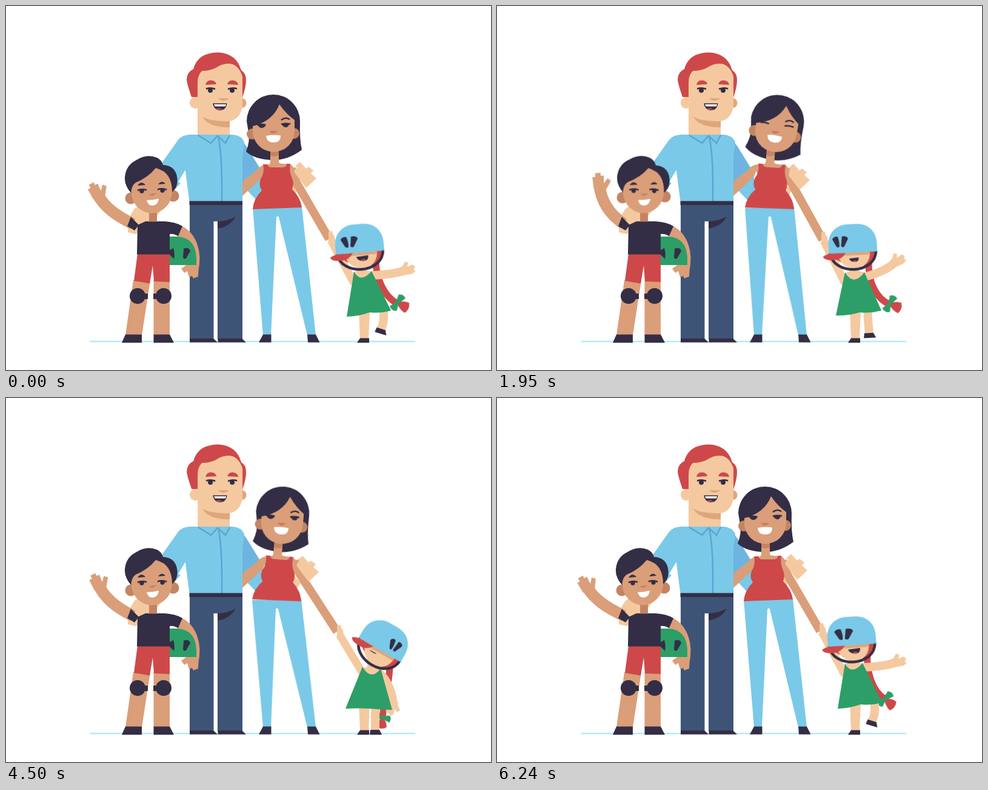
Animation, 800 px wide and 600 px high, one loop 6270 ms. Source, as an HTML page without scripts:

```html
<!DOCTYPE html>
<html lang="en">
<head>
<meta charset="utf-8">
<title>Family</title>
<style>
html, body { margin: 0; width: 100%; height: 100%; overflow: hidden; background: #fff; }
svg { display: block; width: 100vw; height: 100vh; }

.light { fill: #f5c9a0; } .lightDk { fill: #dfa67c; }
.tan { fill: #da9e79; } .tanDk { fill: #c48463; }
.ink { fill: #332e45; } .red { fill: #ce4849; }
.sky { fill: #7ac9e8; } .skyDk { fill: #6db5e0; }
.denim { fill: #3e5476; } .green { fill: #2d9e68; } .white { fill: #fff; }
.line { fill: none; stroke: #332e45; stroke-width: 2.5; }
.seam { fill: none; stroke: #5aa5d3; stroke-width: 2.5; }
.limb { fill: none; stroke-width: 14; }
.limb.l { stroke: #f5c9a0; } .limb.t { stroke: #da9e79; }

.a { animation: 6270ms ease-in-out infinite; }
.wave { animation: 447.857ms cubic-bezier(.37,0,.63,1) -107ms infinite alternate; }

/* boy */
#bArm { animation-name: bArm; stroke-width: 19; }
#bHand { animation-name: bHand; }
#bHead { animation-name: bHead; transform-origin: 242px 345px; }
@keyframes bArm {
  from { d: path("M209 359 C181 346 160 334 146 314"); }
  to { d: path("M209 359 C191 344 179 320 181 285"); }
}
@keyframes bHand {
  from { transform: translate(146px,315px) rotate(-33deg); }
  to { transform: translate(181px,286px) rotate(9deg); }
}
@keyframes bHead {
  0%, 71.8%, 99.5%, 100% { transform: none; }
  17.2%, 31.1%, 82.8% { transform: rotate(2deg); }
  53.1% { transform: rotate(3.5deg); }
}

/* father */
#fHead { animation-name: fHead; transform-origin: 342px 204px; }
#fShirt { animation-name: fShirt; transform-origin: 342px 322px; }
.fHand { animation-name: fHand; }
.open { animation-name: open; animation-timing-function: step-end; }
.shut { animation-name: shut; animation-timing-function: step-end; }
.pupil { animation-name: pupil; }
@keyframes fHead {
  0%, 38%, 69%, 100% { transform: none; }
  46%, 60.5% { transform: rotate(12deg); }
  82.8% { transform: translate(1px,0); }
}
@keyframes fShirt {
  0%, 38%, 69%, 100% { transform: none; }
  46%, 60.5% { transform: skewX(1deg); }
  82.8% { transform: skewX(-.5deg); }
}
@keyframes fHand {
  0%, 100% { transform: none; }
  17.2%, 82.8% { transform: translate(3px,1px); }
  31.1%, 53.1%, 71.8% { transform: translate(4px,3px); }
}
@keyframes pupil { 0%, 38%, 69%, 100% { transform: none; } 46%, 60.5% { transform: translate(2px,-1px); } }
@keyframes open { 0% { opacity: 1; } 41% { opacity: 0; } 65% { opacity: 1; } }
@keyframes shut { 0% { opacity: 0; } 41% { opacity: 1; } 65% { opacity: 0; } }

/* mother */
.mHead { animation-name: mHead; transform-origin: 443px 250px; }
#mTorso { animation-name: mTorso; transform-origin: 447px 334px; }
#mLegs { animation-name: mLegs; transform-origin: 460px 542px; }
#mArm { animation-name: mArm; }
.look { animation-name: look; animation-timing-function: step-end; }
@keyframes mHead {
  0%, 100% { transform: none; }
  17.2% { transform: translate(4.5px,0); }
  31.1% { transform: translate(11px,0) rotate(10deg); }
  53.1% { transform: translate(11px,0) rotate(11.5deg); }
  71.8% { transform: translate(10px,0) rotate(5deg); }
  82.8% { transform: translate(6px,0); }
  99.5% { transform: translate(1px,0); }
}
@keyframes mTorso {
  0%, 99.5%, 100% { transform: none; }
  17.2%, 82.8% { transform: translate(1px,0) rotate(2deg); }
  31.1% { transform: translate(2px,0) rotate(4deg); }
  53.1% { transform: translate(-2px,0) rotate(5deg); }
  71.8% { transform: translate(-1px,0) rotate(4.5deg); }
}
@keyframes mLegs {
  0%, 99.5%, 100% { transform: none; }
  17.2%, 82.8% { transform: skewX(-.3deg); }
  31.1% { transform: skewX(-.55deg); }
  53.1% { transform: skewX(.65deg); }
  71.8% { transform: skewX(.3deg); }
}
@keyframes mArm {
  0%, 99.5%, 100% { d: path("M471 268 L479 291 L533 384"); }
  17.2%, 82.8% { d: path("M474 268 L482 291 L540 386"); }
  31.1% { d: path("M478 268 L485 291 L537 385"); }
  44%, 53.1%, 71.8% { d: path("M476 268 L485 291 L546 385"); }
}
@keyframes look { 0% { opacity: 1; } 30.4% { opacity: 0; } 32.6% { opacity: 1; } }

/* girl */
#gHead { animation-name: gHead; transform-origin: 594px 386px; }
#vents { animation-name: vents; transform-origin: 575px 390px; }
#gMouth { animation-name: gMouth; }
#gNeck { animation-name: gNeck; }
#dress { animation-name: dress; }
#armL { animation-name: armL; stroke-width: 13; }
#handL { animation-name: handL; }
#armR { animation-name: armR; }
#handR { animation-name: handR; }
#leg { animation-name: leg; }
#shoe { animation-name: shoe; }
#braid { animation-name: braid; fill: none; stroke: #ce4849; stroke-width: 11; }
#bow { animation-name: bow; }
@keyframes gHead {
  0%, 100% { transform: translate(-12px,-3px) rotate(-5deg); }
  17.2% { transform: none; }
  31.1% { transform: translate(-8px,-3px) rotate(-3deg); }
  44%, 53.1% { transform: translate(39px,12px) rotate(35deg); }
  71.8% { transform: translate(34px,9px) rotate(30deg); }
  82.8% { transform: translate(2px,0); }
  99.5% { transform: translate(-10px,-2px) rotate(-4deg); }
}
@keyframes vents {
  0%, 100% { transform: translate(4px,0) scale(1.1,1); }
  17.2%, 31.1% { transform: none; }
  44%, 53.1%, 71.8% { transform: translate(38px,0) scale(.85,1); }
  82.8% { transform: translate(28px,0) scale(1.2,1); }
  99.5% { transform: translate(8px,0) scale(1.2,1); }
}
@keyframes gMouth {
  0%, 99.5%, 100% { transform: translate(597px,415px) scale(1.25); }
  17.2%, 31.1%, 82.8% { transform: translate(595px,418px); }
  44%, 53.1%, 71.8% { transform: translate(586px,417px) scale(.8,.25); }
}
@keyframes gNeck {
  0%, 99.5%, 100% { transform: translate(-6px,-5px); }
  17.2%, 82.8% { transform: translate(1px,0); }
  31.1% { transform: translate(-4px,-4px); }
  44%, 53.1%, 71.8% { transform: translate(9px,2px); }
}
@keyframes dress {
  0%, 99.5%, 100% { d: path("M574 438 Q585 458 603 437 L635 502 Q618 507 600 505 Q580 512 562 512Z"); }
  17.2% { d: path("M580 443 Q594 470 609 442 L637 508 Q620 514 600 512 Q580 511 562 512Z"); }
  31.1% { d: path("M574 439 Q588 463 606 439 L634 502 Q616 507 598 505 Q580 511 559 510Z"); }
  44%, 53.1% { d: path("M588 445 Q600 467 619 447 L643 511 Q625 515 605 512 Q585 510 566 514Z"); }
  71.8% { d: path("M588 443 Q602 467 618 446 L637 514 Q618 514 600 512 Q580 511 560 512Z"); }
  82.8% { d: path("M581 443 Q595 470 612 443 L637 508 Q618 514 600 512 Q580 513 560 514Z"); }
}
@keyframes armL {
  0%, 99.5%, 100% { d: path("M574 457 L536 386"); }
  17.2%, 82.8% { d: path("M580 457 L544 390"); }
  31.1% { d: path("M574 457 L539 387"); }
  44%, 53.1%, 71.8% { d: path("M589 455 L550 390"); }
}
@keyframes handL {
  0%, 99.5%, 100% { transform: translate(536px,384px); }
  17.2%, 82.8% { transform: translate(543px,387px); }
  31.1% { transform: translate(539px,385px); }
  44%, 53.1%, 71.8% { transform: translate(550px,387px); }
}
@keyframes armR {
  0%, 99.5%, 100% { d: path("M600 444 Q635 443 655 437"); }
  8.6% { d: path("M604 447 Q640 442 664 432"); }
  17.2% { d: path("M608 450 Q640 443 658 428"); }
  24% { d: path("M606 448 Q640 441 664 431"); }
  31.1% { d: path("M604 447 Q638 439 655 424"); }
  36.7% { d: path("M608 450 Q645 445 670 438"); }
  44%, 53.1% { d: path("M614 455 Q624 458 624 478"); }
  71.8% { d: path("M614 452 Q634 468 639 503"); }
  78.1% { d: path("M612 450 Q645 450 671 438"); }
  82.8% { d: path("M608 451 Q642 454 663 440"); }
  90.9% { d: path("M607 448 Q640 448 663 440"); }
}
@keyframes handR {
  0%, 99.5%, 100% { transform: translate(655px,437px) rotate(-10deg); }
  8.6% { transform: translate(664px,432px) rotate(-16deg); }
  17.2% { transform: translate(658px,428px) rotate(-25deg); }
  24% { transform: translate(664px,431px) rotate(-20deg); }
  31.1% { transform: translate(655px,424px) rotate(-25deg); }
  36.7% { transform: translate(670px,438px) rotate(-15deg); }
  44%, 53.1% { transform: translate(622px,478px) rotate(95deg); }
  71.8% { transform: translate(639px,503px) rotate(115deg); }
  78.1% { transform: translate(671px,438px) rotate(-15deg); }
  82.8% { transform: translate(663px,441px) rotate(-16deg); }
  90.9% { transform: translate(663px,440px) rotate(-12deg); }
}
@keyframes leg {
  0%, 99.5%, 100% { d: path("M622 498 Q626 520 617 536"); }
  17.2% { d: path("M617 505 Q619 525 614 546"); }
  31.1% { d: path("M611 498 Q612 520 614 541"); }
  44%, 53.1%, 71.8%, 82.8% { d: path("M609 505 Q609 525 609 549"); }
}
@keyframes shoe {
  0%, 99.5%, 100% { transform: translate(618px,536px) rotate(17deg); }
  17.2% { transform: translate(613px,546px) rotate(15deg); }
  31.1% { transform: translate(614px,543px) rotate(-3deg); }
  44%, 53.1%, 71.8%, 82.8% { transform: translate(609px,551px); }
}
@keyframes braid {
  0%, 100% { d: path("M610 420 C610 450 625 480 645 490"); }
  17.2% { d: path("M622 425 C618 455 625 490 648 502"); }
  31.1% { d: path("M613 420 C612 455 625 482 648 492"); }
  44%, 53.1%, 71.8% { d: path("M633 440 C633 470 623 500 621 528"); }
  82.8% { d: path("M620 425 C621 455 606 490 608 514"); }
  99.5% { d: path("M611 422 C609 452 620 485 640 496"); }
}
@keyframes bow {
  0%, 100% { transform: translate(645px,489px) rotate(28deg); }
  17.2% { transform: translate(648px,501px) rotate(30deg); }
  31.1% { transform: translate(647px,491px) rotate(22deg); }
  44%, 53.1%, 71.8% { transform: translate(621px,526px) rotate(95deg) scale(.9); }
  82.8% { transform: translate(609px,515px) rotate(92deg) scale(.9); }
  99.5% { transform: translate(639px,496px) rotate(40deg); }
}
</style>
</head>
<body>
<svg viewBox="0 0 800 600">
<path d="M138.500 553H675" stroke="#b5ebf5" stroke-width="2.500"/>

<!-- father -->
<path class="skyDk" d="M388 220 L397 232 L418 266 L428 298 L414 321 L389 290Z"/>
<path class="sky" d="M420 280 L428 298 L414 321 L396 302Z"/>
<path class="tan" d="M432 261 Q421 261 414 270 L389 290 V314 L424 281Z"/>
<path class="light" d="M240 315 L212 334 L202 350 L201 373 L214 376 L236 362 L262 330Z"/>
<path class="sky" d="M304 212 Q290 212 283 222 L256 260 L276 305 L288 292 L284 290 L296 270 L320 230Z"/>
<g id="fHead" class="a">
  <circle class="lightDk" cx="388.500" cy="160" r="8"/>
  <path class="light" d="M316 222 V110 L340 90 H375 L390 108 V165 Q387 186 369 190 V222Z"/>
  <path class="lightDk" d="M324 182 Q334 190 369 190 V200 Q332 200 324 182Z"/>
  <circle class="light" cx="312.500" cy="159.500" r="9.700"/>
  <path class="red" d="M316 150 H306 Q299 130 298 122 Q298 109 309 104 Q316 77 350 76.500 Q380 78 388 106 Q396 111 396 122 Q396 133 390 151 V116 Q383 95 367 95 Q356 95 346 102 Q336 107 323 107 Q316 114 316 126Z"/>
  <path class="red" d="M329 130 Q331 122 338 122.500 Q346 123 347 129Z M365 129 Q367 122 374 122.500 Q382 123 383 130Z"/>
  <path class="line" d="M330 136.500 Q338 134 345 137 M366 137 Q374 134 381 136.500"/>
  <g class="ink a pupil"><circle cx="337" cy="139" r="4"/><circle cx="373" cy="139" r="4"/></g>
  <path class="lightDk" d="M350 152 H368 Q361 158 354 155Z"/>
  <g class="a open">
    <path class="ink" d="M341 160.500 H364.500 Q363 172 352 172 Q343 171 341 160.500Z"/>
    <path class="white" d="M343 162 H363 L362 165.500 H344.500Z"/>
    <path class="red" d="M346 169.500 Q351 166.500 357 170.500 Q351 172.500 346 169.500Z"/>
  </g>
  <path class="line a shut" d="M345 165 Q355 169.500 366 165" stroke-linecap="round" opacity="0"/>
</g>
<g id="fShirt" class="a">
  <path class="sky" d="M302 212 H374 Q388 213 393 224 L390 250 V322 H302.500 L296 272 L288 235Z"/>
  <path class="seam" d="M317 213 L338 226 L349 214 L362 226 L369 213 M350 215 Q357 245 356 322"/>
</g>
<path class="denim" d="M303 327 H390 V549 H349 V355 H342.500 V549 H303Z"/>
<path class="ink" d="M302.500 321.500 H390 V328 H302.500Z M349 355 Q367 354 378.500 347 Q371 363 349 367Z M303 548 H342 L349 554.500 H303Z M349.500 548 H389 L396 554.500 H349.500Z"/>

<!-- mother -->
<g id="mLegs" class="a">
  <path class="sky" d="M407 333 L488 331 Q491 360 495 395 L511 543 H497 L450 348 Q448 345 446 348 L437 543 H424Z"/>
</g>
<path class="ink" d="M424 541.500 H437.500 V554.500 H417Z M497 541.500 H511 L517.500 554.500 H498Z"/>
<g class="a mHead">
  <path class="ink" d="M397 190 A44 44 0 0 1 485 190 Q484 220 488 237 Q466 254 440 254 Q410 253 396 240 Q403 222 400 208Z"/>
</g>
<path class="light a fHand" d="M468 286 L482 302 L475 312 L470 302Z"/>
<path id="mArm" class="limb t a" stroke-linejoin="round" d="M471 268 L479 291 L533 384"/>
<path class="light a fHand" d="M474 272 L480 266 L477 264 L485 257 L495 268 L499 265 L507 271 L503 276 L512 284 L495 300 L489 292Z"/>
<g id="mTorso" class="a">
  <path class="tan" d="M436 236 H450 V258 Q453 261 466 260 Q473 261 476 270 L474 292 L425 280 L419 270 Q422 261 434 261 Q436 260 436 256Z"/>
  <path class="tanDk" d="M436 238 H450 V246 Q443 249 436 247Z"/>
  <path class="red" d="M424 261 Q427 275 420 285 Q416 296 422 304 Q408 318 407 335 L488 332 Q486 316 472 302 Q476 292 471 282 Q467 272 469 260 L463 260 Q463 266 456 266 H438 Q432 266 431 261Z"/>
</g>
<g class="a mHead">
  <g class="tanDk"><circle cx="406" cy="211" r="9"/><circle cx="475" cy="210" r="9"/></g>
  <path class="tan" d="M407 198 Q440 190 451 162 Q462 178 476 188 V206 A34.500 34.500 0 0 1 407 206Z"/>
  <path class="line" d="M454 188 Q461 182 468 187 M454 195 Q461 193 469 194.500 M414 196 Q421 194 428 196"/>
  <g class="ink a look"><path d="M415 195 H429 Q427 201 421 201 Q416 200 415 195Z M455 194 H467 Q466 200 461 200 Q456 199 455 194Z"/></g>
  <path fill="#c57a60" d="M434 206 H448 Q442 212 437 209Z"/>
  <path class="white" d="M429 214 Q441 212 453 213.500 Q453 225 441 225 Q430 225 429 214Z"/>
</g>

<!-- girl -->
<path id="braid" class="a" d="M610 420 C610 450 625 480 645 490"/>
<g id="bow" class="a">
  <path class="red" d="M2 -2 Q9 -9 18 -9 Q24 0 19 9 Q9 8 2 2Z"/>
  <path class="green" d="M-2 0 L-4 -13 Q2 -18 9 -13 L3 0 L6 12 Q-1 17 -8 11Z"/>
</g>
<path id="armR" class="limb l a" d="M600 444 Q635 443 655 437"/>
<path id="handR" class="light a" d="M-4 -7 L0 -8 L6 -15 L11 -12 L8 -6 L17 -8 L21 -4 L18 0 L20 4 L14 7 H-4Z"/>
<path class="light" d="M582 503 H600 L598 549 H584Z"/>
<path class="ink" d="M584 547.500 H599 V555 H579Z"/>
<path id="leg" class="limb l a" d="M622 498 Q626 520 617 536"/>
<path id="shoe" class="ink a" d="M-8 -4 H7 L11 4 H-9Z"/>
<path id="armL" class="limb l a" d="M574 457 L536 386"/>
<path id="handL" class="light a" d="M-4 -12 L2 -13 L3 -8 L6 -4 L7 8 L-4 9Z"/>
<path id="gNeck" class="light a" d="M578 444 L587 441 V428 H601 V441 L611 443 Q596 475 578 444Z"/>
<path id="dress" class="green a" d="M574 438 Q585 458 603 437 L635 502 Q618 507 600 505 Q580 512 562 512Z"/>
<g id="gHead" class="a">
  <path class="red" d="M600 408 H630 Q629 428 612 434Z M560 408 H580 L577 426 Q565 422 560 408Z"/>
  <path class="line" style="stroke-width:4.500" d="M556 408 C559 446 630 448 632 408"/>
  <path class="light" d="M567 408 H622 Q622 434 596 435 Q572 434 567 408Z"/>
  <path class="lightDk" d="M567 408 H622 V414 H568Z"/>
  <g id="gMouth" class="a">
    <path class="ink" d="M-8 1 L8 0 Q8 7 2 7 Q-6 7 -8 1Z"/>
    <path class="red" d="M-3 6 Q2 3 5 6 Q1 8 -3 6Z"/>
  </g>
  <path class="sky" d="M554 409.500 V396 C554 373 571 362.500 586 362.500 H602 C618 363 634 373 634 396 V409.500Z"/>
  <path class="red" d="M544 414 Q549 410 556 409.500 H582 Q574 422 558 420 Q547 420 544 414Z"/>
  <path id="vents" class="ink a" d="M561 386 Q564 381 570 382 Q573 391 572 399 Q569 401 567 398Z M577 382 Q585 381 587 386 L580 399 Q577 401 575 398Z"/>
</g>

<!-- boy -->
<path class="limb t" style="stroke-width:18" d="M283 369 C307 380 315 408 308 437"/>
<path class="tan" d="M300 425 H318 L317 446 L309 449 L307 445 L302 447 L299 437 L294 440 L289 433Z"/>
<path class="green" d="M268 380 H283 Q313 382 314 416 V427 H268Z"/>
<path class="ink" d="M269 403 L276 399 Q279 408 277 417 L269 409Z M293 400 Q302 397 304 404 L297 416 Q294 418 292 415Z"/>
<path class="tan" d="M210 452 H238 L224 543 H197Z M243.500 452 H270 V543 H243.500Z"/>
<path class="red" d="M217 408 H270 V455 L244 454 L242 428 L237 457.500 L211 453Z"/>
<g class="ink">
  <circle cx="217" cy="478" r="13"/><circle cx="260" cy="478" r="13"/>
  <path d="M226 474 H234 V483 H226Z M243 474 H252 V483 H243Z M197 541.500 H224 V555 H191Z M243.500 541.500 H270 L277 555 H243.500Z"/>
</g>
<path id="bArm" class="limb t wave" d="M209 359 C181 346 160 334 146 314"/>
<path id="bHand" class="tan wave" d="M-9.500 4 L-10 -15 H-5 V-21 H4 V-16 H9 L8 -3 L15 -11 L20 -6 L9.500 9Z"/>
<path class="ink" d="M206 347.500 L219 361 L212 370 L200 363Z M217 361 L230 355 H262 Q280 356 291 363 L284 379 Q276 375 270 376 V409.500 H216Z"/>
<path class="tanDk" d="M236 336 H249 V355.500 H236Z"/>
<g id="bHead" class="a">
  <circle class="tanDk" cx="276" cy="313" r="9.500"/>
  <circle class="tanDk" cx="206" cy="317" r="9.500"/>
  <path class="ink" d="M207 309 Q195 296 196 282 Q198 262 215 254 Q232 243 249 250 Q257 254 259 262 Q280 263 282.500 284 Q284 298 275 306Z"/>
  <path class="tan" d="M206.500 306 Q207 296 214 291 Q234 283 247 267 Q262 271 268 281 Q274 291 274 306 A33.750 35.500 0 0 1 206.500 306Z"/>
  <path class="ink" d="M217 296 Q223 287 230 295Z M251 294 Q257 286 263 293Z"/>
  <path class="line" d="M217 304 Q224 301 232 303.500 M250 302.500 Q258 300 265 303"/>
  <g class="ink"><circle cx="224" cy="305" r="3.700"/><circle cx="258" cy="304" r="3.700"/></g>
  <path class="tanDk" d="M236 310 L248 308.500 Q244 314 238 312.500Z"/>
  <path class="white" d="M232 320 Q242 320 252 317.500 Q251 328 242 329 Q234 329 232 320Z"/>
</g>
</svg>
</body>
</html>
```
